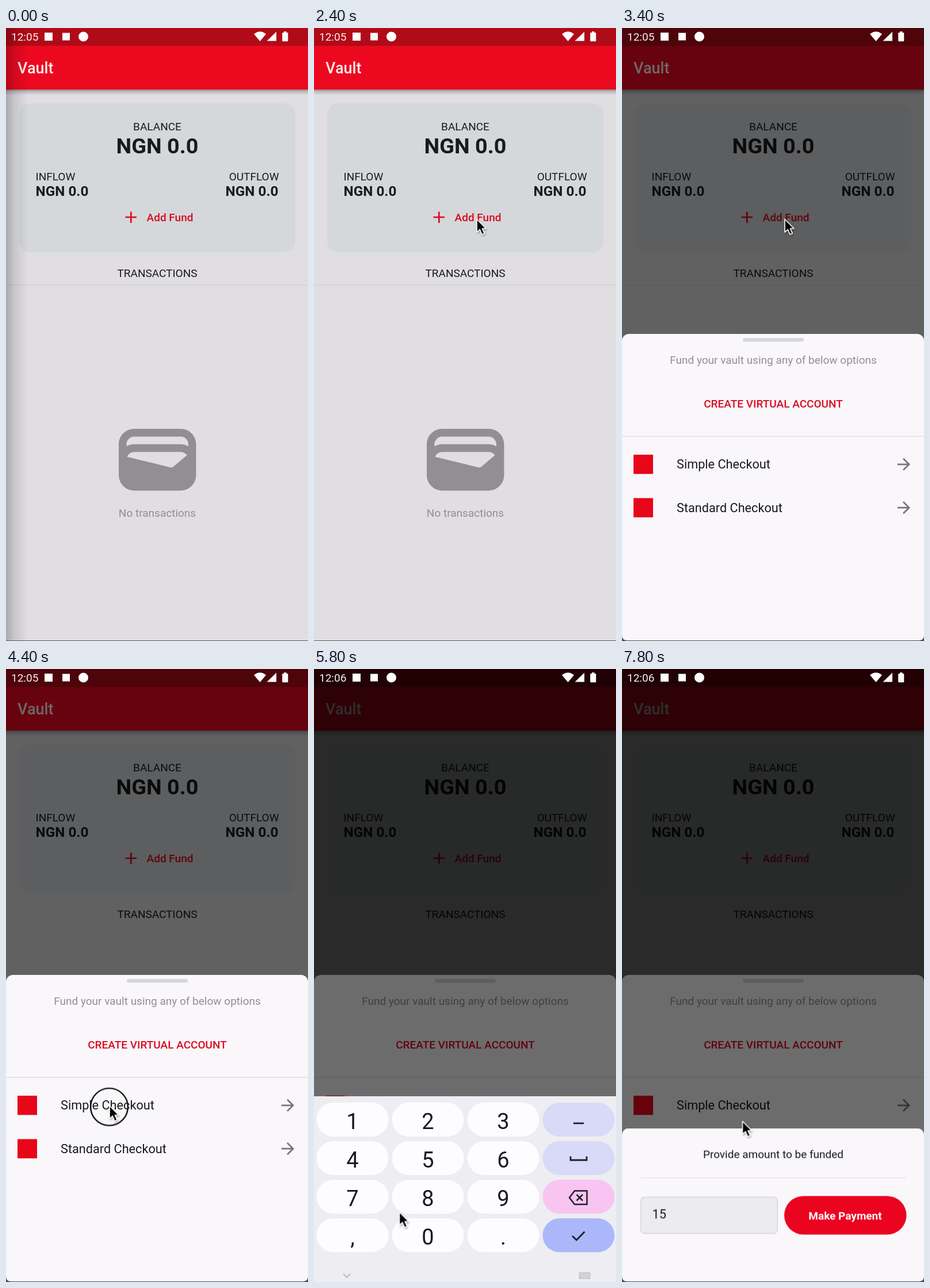
An HTML page that plays this animation: 525 by 1066 pixels, repeating every 8000 ms.

```html
<!DOCTYPE html>
<html lang="en">
<head>
<meta charset="utf-8">
<title>Vault</title>
<style>
html, body { margin: 0; width: 100%; height: 100%; overflow: hidden; background: #e0dee1; }
svg { display: block; width: 100vw; height: 100vh; }
text { font: 400 19px Roboto, sans-serif; fill: #1a1a1d; }
.mid { text-anchor: middle; }
.end { text-anchor: end; }
.grey { fill: #918f93; }
.red { fill: #dc0a20; font-weight: 500; }
.bold { font-weight: 700; }
.row { font-size: 21.7px; }
.digit { font-size: 38px; text-anchor: middle; }
.line { fill: none; stroke: #1f1f27; stroke-width: 2.8; }
.dim { fill: #000; opacity: .565; }

.anim { animation: 8s step-end -10ms infinite; }
#edge { animation-name: edge; }
#early { animation-name: early; }
#late, #amount { animation-name: late; }
#options { animation-name: options; }
#lift { animation-name: lift; }
#keyboard { animation-name: keyboard; }
#hint { animation-name: hint; }
#one { animation-name: one; }
#five { animation-name: five; }
#ring { animation-name: ring; }
#cursor { animation-name: cursor; }

@keyframes edge { 0% { opacity: 1 } 22.5%, 100% { opacity: 0 } }
@keyframes early { 0% { opacity: 1 } 57.5%, 100% { opacity: 0 } }
@keyframes late { 0% { opacity: 0 } 57.5%, 100% { opacity: 1 } }
@keyframes options { 0% { opacity: 0 } 32.5%, 100% { opacity: 1 } }
@keyframes keyboard { 0% { opacity: 0 } 72.5% { opacity: 1 } 95%, 100% { opacity: 0 } }
@keyframes hint { 0% { opacity: 1 } 82.5%, 100% { opacity: 0 } }
@keyframes one { 0% { opacity: 0 } 82.5%, 100% { opacity: 1 } }
@keyframes five { 0% { opacity: 0 } 87.5%, 100% { opacity: 1 } }
@keyframes lift {
  0% { transform: translateY(0) }
  75% { transform: translateY(-323px) }
  95% { transform: translateY(-60px) }
  97.5%, 100% { transform: translateY(-2.5px) }
}
@keyframes ring {
  0%, 30%, 57.5%, 70%, 85%, 90%, 100% { opacity: 0 }
  27.5%, 55%, 67.5%, 82.5%, 87.5% { opacity: 1 }
}
@keyframes cursor {
  0% { transform: translate(545px, 545px) }
  2.5% { transform: translate(508px, 530px); animation-timing-function: steps(6) }
  17.5%, 37.5% { transform: translate(283px, 332.5px) }
  37.5% { animation-timing-function: steps(5) }
  50%, 57.5% { transform: translate(180px, 759.5px) }
  57.5% { animation-timing-function: steps(3) }
  65%, 75% { transform: translate(148.5px, 944.5px) }
  75% { animation-timing-function: steps(3) }
  82.5% { transform: translate(70px, 788px); animation-timing-function: steps(2) }
  87.5%, 90% { transform: translate(200px, 855px) }
  90% { animation-timing-function: steps(3) }
  97.5%, 100% { transform: translate(209.5px, 786.5px) }
}
</style>
</head>
<body>
<svg viewBox="0 0 525 1066" preserveAspectRatio="none">
  <defs>
    <linearGradient id="barShade" x2="0" y2="1">
      <stop stop-opacity=".42"/><stop offset=".4" stop-opacity=".16"/><stop offset="1" stop-opacity="0"/>
    </linearGradient>
    <linearGradient id="sideShade">
      <stop stop-opacity=".24"/><stop offset=".4" stop-opacity=".1"/><stop offset="1" stop-opacity="0"/>
    </linearGradient>
    <filter id="soft" x="-50%" y="-50%" width="220%" height="220%">
      <feDropShadow dx="1" dy="2" stdDeviation="1.5" flood-opacity=".35"/>
    </filter>
    <path id="arrow" fill="#77757a" d="M12 4l-1.41 1.41L16.17 11H4v2h12.17l-5.58 5.59L12 20l8-8z"/>
    <path id="corners" fill="#4b4a4d" d="M0 1056Q0 1065 9 1065H516Q525 1065 525 1056V1066H0Z"/>
  </defs>

  <g id="home">
    <rect width="525" height="1066" fill="#e0dee1"/>
    <rect y="106" width="525" height="11" fill="url(#barShade)"/>
    <rect y="31" width="525" height="76" fill="#ec0920"/>
    <rect width="525" height="31" fill="#b00b18"/>
    <text x="20" y="78.5" style="font-size:27px;font-weight:500;fill:#fbeef0">Vault</text>

    <rect x="23" y="131" width="480" height="259" rx="19" fill="#d4d8da"/>
    <text class="mid" x="263" y="178">BALANCE</text>
    <text class="mid bold" x="263" y="218" style="font-size:37.8px">NGN 0.0</text>
    <text x="51.5" y="264.5">INFLOW</text>
    <text class="bold" x="51.5" y="291.5" style="font-size:24.3px">NGN 0.0</text>
    <text class="end" x="474.5" y="264.5">OUTFLOW</text>
    <text class="end bold" x="473.5" y="291.5" style="font-size:24.3px">NGN 0.0</text>
    <path d="M207.5 329H227M217.3 319.5V339" stroke="#dc0a20" stroke-width="2.7"/>
    <text class="red" x="244.5" y="336">Add Fund</text>

    <text class="mid" x="263" y="433">TRANSACTIONS</text>
    <rect y="446.5" width="525" height="1.3" fill="#d0d1d4"/>
    <path fill="#918f92" transform="translate(182.6 670.1) scale(6.72)" d="M18 4H6C3.79 4 2 5.79 2 8v8c0 2.21 1.79 4 4 4h12c2.21 0 4-1.79 4-4V8c0-2.21-1.79-4-4-4zm-1.86 9.77c-.24.2-.57.28-.88.2L4.15 11.25C4.45 10.52 5.16 10 6 10h12c.67 0 1.26.34 1.63.84zM6 6h12c1.1 0 2 .9 2 2v.55c-.59-.34-1.27-.55-2-.55H6c-.73 0-1.41.21-2 .55V8c0-1.1.9-2 2-2z"/>
    <text class="mid grey" x="263" y="850">No transactions</text>
    <rect id="edge" class="anim" width="38" height="1066" fill="url(#sideShade)"/>
    <rect y="1065" width="525" height="1" fill="#5a595c"/>
  </g>

  <g id="options" class="anim">
    <rect class="dim" width="525" height="1066"/>
    <rect y="532" width="525" height="560" rx="12" fill="#f9f7fa"/>
    <rect x="210" y="539" width="106" height="6.5" rx="3.2" fill="#d4d8da"/>
    <text class="mid grey" x="263" y="583.5">Fund your vault using any of below options</text>
    <text class="mid red" x="263" y="660">CREATE VIRTUAL ACCOUNT</text>
    <rect y="709.5" width="525" height="1.3" fill="#dfdee2"/>
    <rect x="20" y="742" width="34" height="33.5" fill="#e8061b"/>
    <text class="row" x="95" y="766">Simple Checkout</text>
    <use href="#arrow" transform="translate(473.4 742.2) scale(1.38)"/>
    <rect x="20" y="817.5" width="34" height="33.5" fill="#e8061b"/>
    <text class="row" x="95" y="841.5">Standard Checkout</text>
    <use href="#arrow" transform="translate(473.4 817.6) scale(1.38)"/>
    <use href="#corners"/>
  </g>

  <g id="amount" class="anim">
    <rect class="dim" width="525" height="1066"/>
    <g id="lift" class="anim">
      <rect y="801" width="525" height="640" rx="12" fill="#f9f7fa"/>
      <text class="mid" x="263" y="853">Provide amount to be funded</text>
      <rect x="32" y="887" width="462" height="1.2" fill="#dfdee2"/>
      <rect x="32.7" y="920.7" width="237.6" height="63.6" rx="7" fill="#ecebed" stroke="#d5d5d8" stroke-width="1.4"/>
      <text id="hint" class="row anim" x="52.5" y="958" style="fill:#646367">5000</text>
      <text id="one" class="row anim" x="52.5" y="958">1</text>
      <text id="five" class="row anim" x="64.7" y="958">5</text>
      <rect x="282" y="919" width="212.5" height="67" rx="33.5" fill="#ea0420"/>
      <text class="mid bold" x="388" y="959.5" style="fill:#fff">Make Payment</text>
    </g>
    <use href="#corners"/>
  </g>

  <g id="keyboard" class="anim">
    <rect y="743" width="525" height="323" fill="#eeedf2"/>
    <g id="keys"></g>
    <path class="line" d="M451 790H469"/>
    <path class="line" d="M446 847.5V854H474V847.5"/>
    <path class="line" d="M453 907.5H474.5V931H453L444 919.2ZM456.5 914L467 924.5M467 914L456.5 924.5" style="stroke-width:2.5"/>
    <path class="line" d="M449 986L456.3 993L470.5 978.5"/>
    <path d="M51 1052L57 1058L63 1052" fill="none" stroke="#c3c2c7" stroke-width="2.6"/>
    <rect x="460.5" y="1049" width="20" height="12" rx="1.5" fill="#c9c8cd"/>
    <path d="M463 1052.5H478M463 1055.5H478M466 1058.5H475" stroke="#eeedf2" stroke-width="1.4" stroke-dasharray="1.8 1.5"/>
  </g>

  <g id="status">
    <text id="early" class="anim" x="9" y="22" style="fill:#f6edef">12:05</text>
    <text id="late" class="anim" x="9" y="22" style="fill:#f6edef">12:06</text>
    <g fill="#fff">
      <rect x="67" y="8" width="14" height="14"/>
      <rect x="98" y="8.5" width="13" height="13"/>
      <circle cx="134.5" cy="15" r="8.5"/>
      <path d="M441.5 23L431 10.5Q441.5 2 452 10.5Z"/>
      <path d="M453.5 22.5H470V6.5Z"/>
      <rect x="483" y="6" width="4.5" height="3"/>
      <rect x="480.2" y="8" width="10.1" height="15.3" rx="1.3"/>
    </g>
  </g>

  <g id="cursor" class="anim">
    <circle id="ring" class="anim" cx="-.5" cy="2" r="32.4" fill="none" stroke="#111" stroke-width="2.4"/>
    <path d="M0 0V22.5L5.2 17.8L9 26.5L13.2 24.7L9.4 16.2H16Z" stroke="#fff" stroke-width="1.6" stroke-linejoin="round" filter="url(#soft)"/>
  </g>
</svg>
<script>
const ns = 'http://www.w3.org/2000/svg';
const keys = document.getElementById('keys');
const sideColors = ['#d9daf7', '#d9daf7', '#f8c4f1', '#aab8fb'];
const rows = ['123', '456', '789', ',0.'];

function add(tag, attrs, text = '') {
  const el = document.createElementNS(ns, tag);
  for (const name in attrs) el.setAttribute(name, attrs[name]);
  el.textContent = text;
  keys.append(el);
}

rows.forEach((row, r) => {
  for (let c = 0; c < 4; c++) {
    const x = 4.5 + c * 131, y = 754 + r * 67.1;
    add('rect', { x, y, width: 125, height: 59, rx: 29.5, fill: c < 3 ? '#fdfcff' : sideColors[r] });
    if (c < 3) add('text', { class: 'digit', x: x + 62.5, y: y + 46 }, row[c]);
  }
});
</script>
</body>
</html>
```
